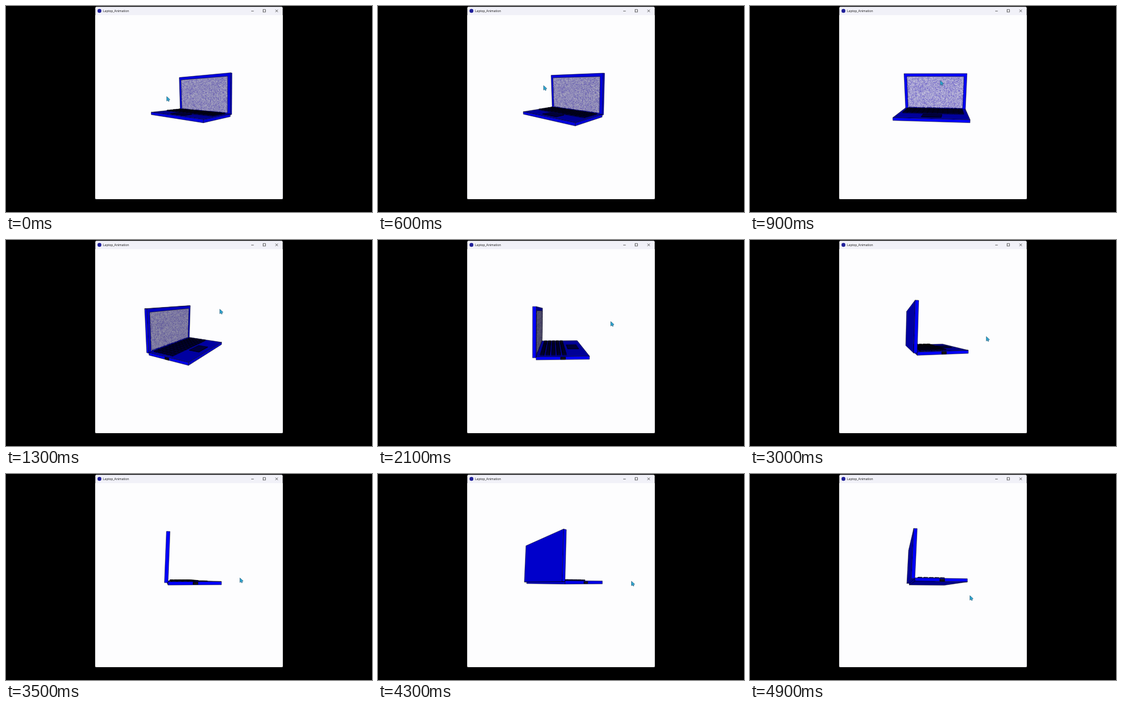
Animation, 600 px wide and 338 px high, one loop 5000 ms. Source, as an HTML page with a canvas:

```html
<!DOCTYPE html>
<html lang="en">
<head>
<meta charset="utf-8">
<title>Laptop_Animation</title>
<style>
  html, body { margin: 0; width: 600px; height: 338px; overflow: hidden; background: #000; }
  svg, canvas { position: absolute; left: 0; top: 0; display: block; }
  text { font: 5px "Open Sans", "Noto Sans", sans-serif; fill: #111; }
</style>
</head>
<body>
<svg width="600" height="338" viewBox="0 0 600 338">
  <rect x="146.4" y="1.3" width="307.2" height="315.4" rx="2" fill="#f1f1f8"/>
  <rect x="146.4" y="15" width="307.2" height="301.7" fill="#fdfdfe"/>
  <circle cx="153.2" cy="8" r="3.2" fill="#20209a"/>
  <text x="159" y="10">Laptop_Animation</text>
  <g fill="none" stroke="#333" stroke-width=".7">
    <path d="M402 8.3h4.2M441.600 5.900l4.200 4.200M445.800 5.900l-4.200 4.200"/>
    <rect x="421.5" y="5.9" width="4" height="4"/>
  </g>
</svg>
<canvas id="stage" width="600" height="338"></canvas>
<script>
const ctx = document.getElementById('stage').getContext('2d');
const LOOP = 5000, STEP = 100, LAG = 130;
const CX = 300, CY = 166, DIST = 261;
const BLUE = [0, 0, 255], KEY = [0, 0, 95], BLACK = [22, 22, 22];
const GLASS = [165, 160, 212], DARK = [108, 96, 205], LIGHT = [212, 209, 228];

// pointer stops: time, x, y
const path = [
  [0, 264, 149], [470, 264, 136], [600, 272, 131],
  [1170, 349, 115.5], [1300, 351, 114], [1970, 379, 130],
  [2470, 391, 146], [2700, 391, 149], [3370, 384, 171],
  [3800, 384, 171], [4550, 432, 179], [4770, 387, 186], [4900, 361, 200]
];

function pointer(t) {
  const i = path.findIndex(stop => stop[0] >= t);
  if (i <= 0) return path[i < 0 ? path.length - 1 : 0].slice(1);
  const a = path[i - 1], b = path[i], k = (t - a[0]) / (b[0] - a[0]);
  return [1, 2].map(j => a[j] + (b[j] - a[j]) * k);
}

function seeded(seed) {
  return () => (seed = (seed * 16807) % 2147483647) / 2147483647;
}

// boxes are [min corner, max corner, forward lean]
const HINGE = -11, TOP = -9.7, LEAN = 0.035;
const lid = [[-56, HINGE, -39.5], [56, 54, -35], LEAN];
const screen = [[-51, -8, -35], [51, 49, -35], LEAN];
const base = [[-56, -14, -35], [56, TOP, 35], 0];
const pad = [[-15, TOP, 10], [15, TOP + 0.4, 27], 0];
const port = [[-57, -13.5, -3], [-56, -10.7, 3.3], 0];
const keys = Array.from({ length: 60 }, (_, i) => {
  const x = -50 + (i % 12) * 8.4, z = -30 + Math.floor(i / 12) * 7.5;
  return [[x, TOP, z], [x + 7.2, TOP + 1.5, z + 5], 0];
});

const rnd = seeded(4217);
const grains = Array.from({ length: 2800 }, () => ({
  p: lean([-51 + rnd() * 101, -8 + rnd() * 56, -35], LEAN),
  tone: rnd() < 0.5 ? DARK : LIGHT
}));

function lean([x, y, z], k) {
  return [x, y, z + (y - HINGE) * k];
}

let sy, cy, sp, cp;

function aim([x, y]) {
  const yaw = (x - CX) * 2 * Math.PI / 307;
  const pitch = (CY - y) * Math.PI / 2 / 302;
  sy = Math.sin(yaw); cy = Math.cos(yaw);
  sp = Math.sin(pitch); cp = Math.cos(pitch);
}

function turn([x, y, z]) {
  const d = z * cy - x * sy;
  return [z * sy + x * cy, y * cp - d * sp, d * cp + y * sp];
}

function project(p) {
  const [x, y, z] = turn(p), s = DIST / (DIST - z);
  return [CX + x * s, CY - y * s, s];
}

const lightOn = n => 0.5 + 0.5 * Math.max(0, turn(n)[2]);
const shade = (color, k) => 'rgb(' + color.map(v => Math.round(v * k)).join() + ')';

function polygon(pts, fill, stroke, width) {
  ctx.beginPath();
  pts.forEach(([x, y]) => ctx.lineTo(x, y));
  ctx.closePath();
  ctx.fillStyle = fill;
  ctx.fill();
  ctx.strokeStyle = stroke;
  ctx.lineWidth = width;
  ctx.stroke();
}

// Draws one side of a box if it faces the viewer, and tells whether it does.
function face(box, axis, side, color) {
  const u = (axis + 1) % 3, v = (axis + 2) % 3;
  const n = [0, 0, 0];
  n[axis] = side ? 1 : -1;
  if (axis === 2) n[1] = -n[2] * box[2];
  const pts = [[0, 0], [1, 0], [1, 1], [0, 1]].map(([i, j]) => {
    const p = [];
    p[axis] = box[side][axis];
    p[u] = box[i][u];
    p[v] = box[j][v];
    return lean(p, box[2]);
  });
  const m = turn(n), c = turn(pts[0]);
  const seen = m[2] * DIST > m[0] * c[0] + m[1] * c[1] + m[2] * c[2];
  if (seen && color) polygon(pts.map(project), shade(color, lightOn(n)), 'rgba(0,0,0,.85)', 0.55);
  return seen;
}

function solid(box, color) {
  for (let i = 0; i < 6; i++) face(box, i >> 1, i & 1, color);
}

function drawLid() {
  solid(lid, BLUE);
  if (!face(screen, 2, 1, GLASS)) return;
  const light = lightOn([0, 0, 1]), w = Math.max(0.15, Math.abs(cy));
  for (const g of grains) {
    const [x, y, s] = project(g.p);
    ctx.fillStyle = shade(g.tone, light);
    ctx.fillRect(x, y, w * s, s);
  }
}

function drawKeys() {
  const depth = k => turn(k[0])[2];
  keys.sort((a, b) => depth(a) - depth(b)).forEach(k => solid(k, KEY));
}

function drawBase() {
  const above = face(base, 1, 1);
  if (!above) drawKeys();
  solid(base, BLUE);
  if (above) {
    solid(pad, KEY);
    drawKeys();
  }
  if (face(base, 0, 0)) solid(port, BLACK);
}

const arrow = [[0, 0], [0, 7.4], [1.7, 6], [2.9, 8.1], [4.1, 7.4], [3.2, 5.4], [5.4, 5]];

function drawPointer([x, y]) {
  polygon(arrow.map(([a, b]) => [x + a - 0.5, y + b - 0.4]), '#28a6d2', '#25546f', 0.6);
}

function draw(t) {
  ctx.clearRect(0, 0, 600, 338);
  ctx.lineJoin = 'round';
  aim(pointer(t - LAG));
  const parts = [drawLid, drawBase];
  if (!face(lid, 2, 1)) parts.reverse();
  parts.forEach(part => part());
  drawPointer(pointer(t));
}

const start = performance.now();
let shown = -1;

function tick(now) {
  const t = Math.floor(Math.max(0, now - start) % LOOP / STEP) * STEP;
  if (t !== shown) draw(shown = t);
  requestAnimationFrame(tick);
}
tick(start);
</script>
</body>
</html>
```
